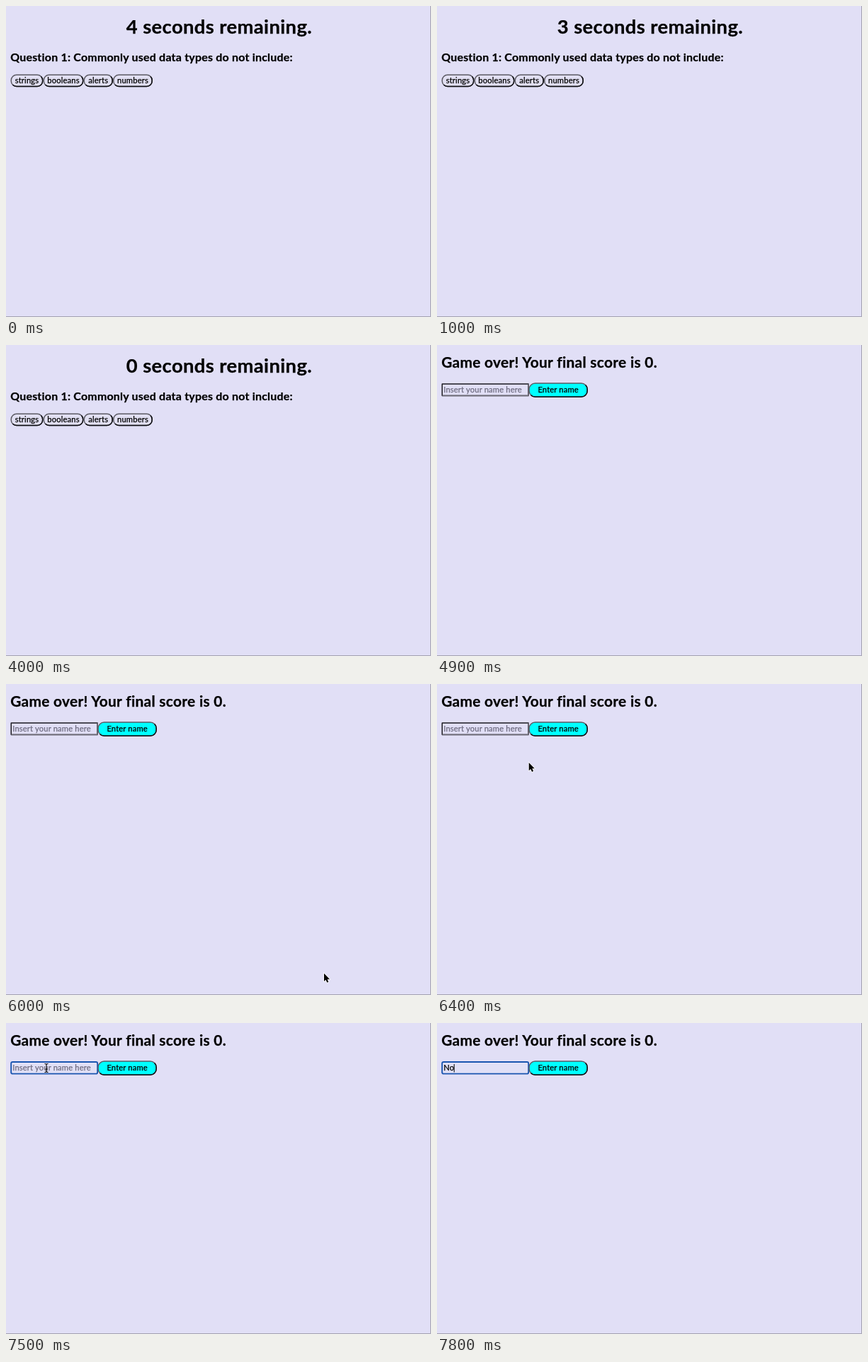
Write an HTML page that moves like this. It is 600 px wide and 439 px high and loops after 8000 ms.

```html
<!DOCTYPE html>
<html lang="en">
<head>
<meta charset="utf-8">
<title>Quiz countdown</title>
<style>
  html, body { margin: 0; width: 100%; height: 100%; overflow: hidden; background: #e1dff6; }
  svg { display: block; width: 600px; height: 439px; }
  text {
    font-family: Lato, "Open Sans", sans-serif;
    font-size: 11.2px;
    letter-spacing: .014em;
    white-space: pre;
    stroke: currentColor;
    stroke-width: .25px;
  }
  .bold { font-weight: 700; }
  .mid { text-anchor: middle; }
  #hint { color: #6f6c80; fill: currentColor; }
</style>
</head>
<body>
<svg id="stage" viewBox="0 0 600 439" xmlns="http://www.w3.org/2000/svg">
  <rect width="600" height="439" fill="#e1dff6"/>
  <g id="quiz">
    <text id="timer" class="bold mid" x="301" y="39" style="font-size:27.4px"></text>
    <text class="bold" x="6.2" y="78" style="font-size:15.95px">Question 1: Commonly used data types do not include:</text>
  </g>
  <g id="over">
    <text class="bold" x="6.2" y="32" style="font-size:20.9px">Game over! Your final score is 0.</text>
    <g id="idleField"></g>
    <rect id="focusRing" x="7.2" y="55" width="122" height="16.6" rx="2.2" fill="#e1e0f6" stroke="#1a55b0" stroke-width="1.9"/>
    <text id="hint" x="9.2" y="67.2">Insert your name here</text>
    <text id="typed" x="9.2" y="67.2"></text>
    <path id="caret" d="M0 58V69.5" stroke="#000"/>
  </g>
  <path id="arrow" d="M0 0V11.2L2.5 8.9L4.3 13L6.3 12.1L4.6 8.2H8Z" stroke="#fff" stroke-width="1.4" paint-order="stroke"/>
  <g id="beam" fill="none">
    <path id="beamShape" d="M-2.5 -6Q0 -6 0 -4.5Q0 -6 2.5 -6M0 -4.5V4.5M-2.5 6Q0 6 0 4.5Q0 6 2.5 6M-1.5 1.5H1.5" stroke="#000" stroke-width="1.1"/>
  </g>
  <path d="M599.5 0V438.5H0" fill="none" stroke="#a3a1b0"/>
</svg>
<script>
const LOOP = 8000;
const GAME_OVER = 4900;
const $ = id => document.getElementById(id);

// Two-tone border: one colour on the top and left, another on the bottom and right.
function bevel(x, y, w, h, r, fill, light, dark) {
  const k = r * (1 - Math.SQRT1_2);
  const right = x + w, bottom = y + h;
  const arc = `A${r} ${r} 0 0 1 `;
  return `<rect x="${x}" y="${y}" width="${w}" height="${h}" rx="${r}" fill="${fill}" stroke="${light}" stroke-width="1.5"/>
    <path d="M${right - k} ${y + k}${arc}${right} ${y + r}V${bottom - r}${arc}${right - r} ${bottom}H${x + r}${arc}${x + k} ${bottom - k}"
      fill="none" stroke="${dark}" stroke-width="1.5"/>`;
}

function button(label, left, right, top, bottom, r, fill) {
  return bevel(left + .8, top + .8, right - left - 1.6, bottom - top - 1.6, r, fill, "#5c5b64", "#0c0c10") +
    `<text class="mid" x="${(left + right) / 2}" y="${(top + bottom) / 2 + 3.7}">${label}</text>`;
}

const edges = [6.5, 52.5, 109.5, 151, 207];
["strings", "booleans", "alerts", "numbers"].forEach((label, i) =>
  $("quiz").insertAdjacentHTML("beforeend",
    button(label, edges[i], edges[i + 1], 96.5, 114.2, 7.5, "#e1dff2")));

$("over").insertAdjacentHTML("beforeend", button("Enter name", 129.3, 213, 53.2, 74, 8.5, "#0ff"));
$("idleField").innerHTML = bevel(7.3, 55, 121.8, 16.6, 0.01, "#e1dff6", "#1c1b20", "#6d6b76");

function show(id, on) {
  $(id).style.display = on ? "" : "none";
}

function place(id, x, y) {
  $(id).setAttribute("transform", `translate(${x} ${y})`);
}

function drawPointer(t) {
  const visible = t >= 6000 && t < 7600;
  const left = 1 - Math.min(1, Math.max(0, (t - 6000) / 800));
  const x = 57 + 392 * left ** 2.43;
  const y = 63.5 + 345 * left ** 2.86;
  const overField = x < 130 && y < 73;
  show("arrow", visible && !overField);
  show("beam", visible && overField);
  place("arrow", x, y);
  place("beam", x, y);
}

function draw(time) {
  const t = Math.floor(time % LOOP / 100) * 100;
  const over = t >= GAME_OVER;
  const focused = t >= 7000;
  const name = t >= 7800 ? "No" : t >= 7600 ? "N" : "";

  show("quiz", !over);
  show("over", over);
  const seconds = 4 - Math.min(4, Math.floor((t + 100) / 1000));
  $("timer").textContent = `${seconds} seconds remaining.`;

  show("idleField", !focused);
  show("focusRing", focused);
  show("hint", !name);
  $("typed").textContent = name;
  show("caret", focused && (name || t < 7500));
  place("caret", 9.2 + (name ? $("typed").getComputedTextLength() : 0), 0);
  drawPointer(t);
}

const start = performance.now();
function tick() {
  draw(performance.now() - start);
  requestAnimationFrame(tick);
}
tick();
</script>
</body>
</html>
```
